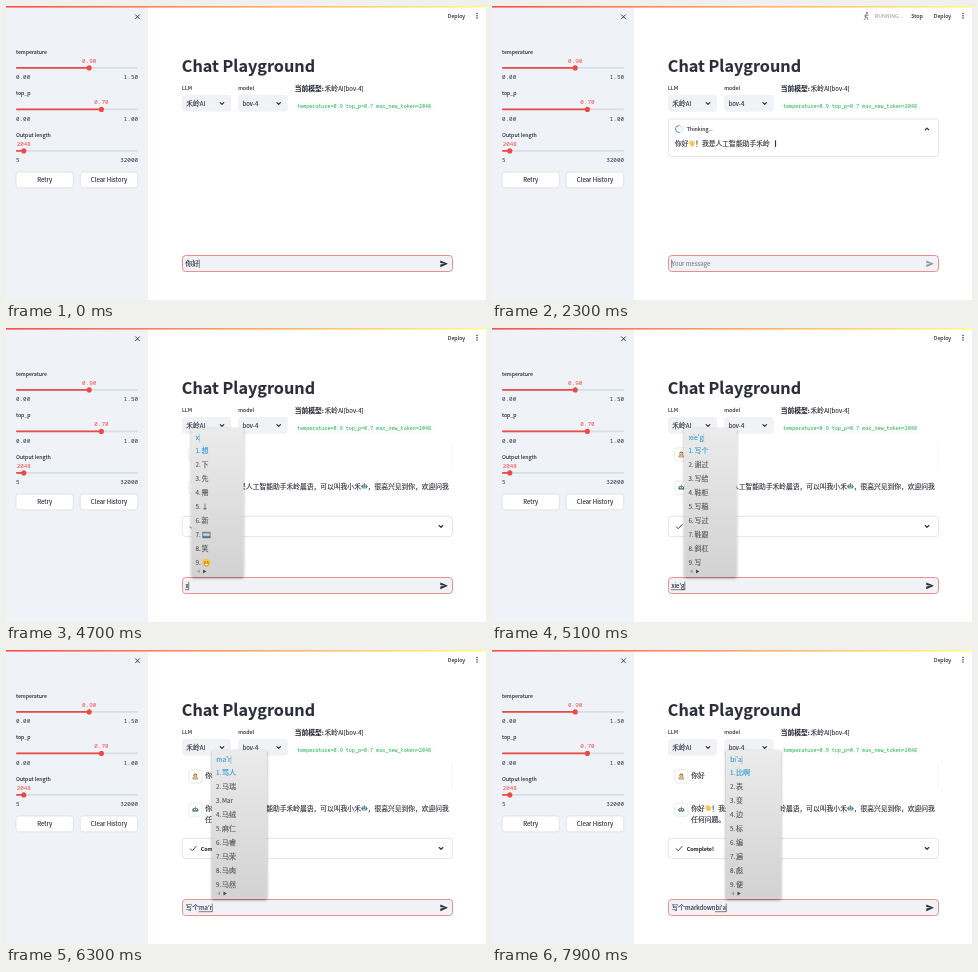
An HTML page that plays this animation: 480 px wide and 294 px high, repeating every 8000 ms.

```html
<!DOCTYPE html>
<html lang="zh-CN">
<head>
<meta charset="utf-8">
<title>Chat Playground</title>
<style>
html, body { margin: 0; width: 100%; height: 100%; overflow: hidden; background: #fff; }
svg { display: block; width: 100%; height: 100%; }
text { font-family: "Noto Sans CJK SC", "Noto Sans CJK", "Noto Sans", sans-serif; white-space: pre; stroke-width: .12; }
text.mono { font-family: "Noto Sans Mono", "DejaVu Sans Mono", monospace; }
</style>
</head>
<body>
<svg viewBox="0 0 480 294">
  <defs>
    <linearGradient id="bar"><stop stop-color="#ff4b4b"/><stop offset="1" stop-color="#fffd80"/></linearGradient>
    <linearGradient id="menu" x2="0" y2="1"><stop stop-color="#ebebeb"/><stop offset="1" stop-color="#d2d2d2"/></linearGradient>
    <filter id="shadow" x="-20%" y="-10%" width="140%" height="120%">
      <feDropShadow dx="0" dy="1" stdDeviation="1.6" flood-opacity=".4"/>
    </filter>
  </defs>
  <g id="fixed"></g>
  <g id="live"></g>
</svg>
<script>
const LOOP = 8000, STEP = 100;
const EM = 6.77, SMALL = 5.92;
const LATIN = 0.895; // Latin letters are drawn smaller than the CJK ones beside them
const INK = '#2b2d39', RED = '#ea4b49', PALE = '#f0f2f6', GREY = '#7f818a', BLUE = '#2a9bd0';
const REPLY = '你好\u3000！我是人工智能助手禾岭晨语，可以叫我小禾\u3000，很高兴见到你，欢迎问我任何问题。';
const HAND = 2, ROBOT = 23;
const SENT = 300, OPENED = 500, STREAM = 1900, DONE = 3200, CHARS_PER_MS = 0.036;

// time, committed text, pinyin being composed, candidates
const TYPING = [
  [0, '你好'],
  [SENT, ''],
  [4500, '', 'x', '想 下 先 需 ↓ 新 @tram 笑 @smile'],
  [4800, '', 'xi', '系 西 洗 喜 戏 细 息 希 吸'],
  [4900, '', 'xie', '写 些 谢 鞋 斜 协 歇 血 携'],
  [5100, '', "xie'g", '写个 谢过 写给 鞋柜 写稿 写过 鞋跟 斜杠 写'],
  [5400, '写个'],
  [5800, '写个', 'm', '吗 没 么 们 买 马 嘛 慢 妈'],
  [6000, '写个', 'ma', '吗 马 妈 嘛 麻 骂 码 玛 蚂'],
  [6200, '写个', "ma'r", '骂人 马瑞 Mar 马绒 麻仁 马睿 马荣 马肉 马然'],
  [6500, '写个', "ma'r'k", '骂人 mark 马瑞 麻仁 马睿 马荣 马肉 马然 马'],
  [6700, '写个', "ma'r'k'd", '骂人 markd 马瑞 麻仁 马睿 马荣 马肉 马然 马'],
  [6900, '写个', "ma'r'k'do", '骂人 markdo 马瑞 麻仁 马睿 马荣 马肉 马然 马'],
  [7000, '写个', 'markdow', 'markdow 骂人 马瑞 麻仁 马睿 马荣 马肉 马然 马'],
  [7100, '写个', 'markdown', 'markdown 骂人 马瑞 麻仁 马睿 马荣 马肉 马然 马'],
  [7300, '写个markdown'],
  [7600, '写个markdown', 'b', '不 吧 把 被 比 别 并 本 北'],
  [7700, '写个markdown', 'bi', '比 必 笔 币 毕 闭 避 鼻 壁'],
  [7900, '写个markdown', "bi'a", '比啊 表 变 边 标 编 遍 彪 便']
];

const ruler = document.createElement('canvas').getContext('2d');
ruler.font = '100px "Noto Sans CJK SC", "Noto Sans CJK", "Noto Sans", sans-serif';

const runs = s => s.match(/[\x20-\x7e]+|[^\x20-\x7e]+/g) || [];
const runSize = (run, size) => run.charCodeAt(0) < 127 ? size * LATIN : size;
const widthOf = (s, size) => runs(s).reduce((w, r) => w + ruler.measureText(r).width * runSize(r, size) / 100, 0);

function text(x, y, s, { size = EM, fill = INK, weight = 400, anchor = 'start' } = {}) {
  const spans = runs(s).map(r => `<tspan font-size="${runSize(r, size)}">${r}</tspan>`).join('');
  return `<text x="${x}" y="${y}" fill="${fill}" stroke="${fill}" font-weight="${weight}" text-anchor="${anchor}">${spans}</text>`;
}
const mono = (x, y, s, fill = INK, anchor = 'start', size = SMALL) =>
  `<text class="mono" x="${x}" y="${y}" fill="${fill}" font-size="${size}" text-anchor="${anchor}">${s}</text>`;
const rect = (x, y, w, h, fill, stroke = 'none', r = 3.2, line = 0.6) =>
  `<rect x="${x}" y="${y}" width="${w}" height="${h}" rx="${r}" fill="${fill}" stroke="${stroke}" stroke-width="${line}"/>`;
const circle = (x, y, r, fill) => `<circle cx="${x}" cy="${y}" r="${r}" fill="${fill}"/>`;
const line = (d, color = INK, w = 1) =>
  `<path d="${d}" fill="none" stroke="${color}" stroke-width="${w}" stroke-linecap="round" stroke-linejoin="round"/>`;
const chevron = (x, y, dir = 1) => line(`M${x - 1.8} ${y - 0.9 * dir}l1.8 ${1.8 * dir}l1.8 ${-1.8 * dir}`, INK, 1.15);
const at = (x, y, s, scale = 1) => `<g transform="translate(${x} ${y}) scale(${scale})">${s}</g>`;

// Small pictures, each about 6.5 units wide and centred on the origin
const icons = {
  hand: line('M-1.6 .2L-2.4-1.6M-.5-.6L-1.1-2.7M.7-.6L.5-2.6M1.8.2L2.5-1.3', '#f3bd35', 1.1) +
    `<ellipse cx=".3" cy="1" rx="2.1" ry="1.9" fill="#f7c744"/>`,
  robot: rect(-2.6, -1.6, 5.2, 4, '#5f8f97', 'none', 1) + rect(-3.2, -0.4, 6.4, 1.5, '#4a747d', 'none', 0.5) +
    line('M0-1.6V-2.7', '#c65a4a', 0.9) + circle(-1.1, -0.3, 0.6, '#fff') + circle(1.1, -0.3, 0.6, '#fff') +
    line('M-1 1.5H1', '#e6efef', 0.6),
  person: circle(0, -1.1, 1.9, '#8a5a3c') + circle(0, -0.7, 1.4, '#f4c471') +
    rect(-3, 0.8, 6, 2.2, '#d99a5b', 'none', 1) + rect(-1.6, 1, 3.2, 1.9, '#b9bec6', 'none', 0.4),
  tram: rect(-3.7, -2.8, 7.4, 5.8, '#75889a', 'none', 0.8) + rect(-2.8, -1.3, 5.6, 2, '#c9dceb', 'none', 0.3) +
    line('M-3.2 2H3.2', '#4f6173', 0.7),
  smile: circle(0, 0, 3.6, '#f9c637') + circle(-1.2, -0.8, 0.5, '#6b4518') + circle(1.2, -0.8, 0.5, '#6b4518') +
    '<path d="M-2 .6H2A2 2 0 0 1-2 .6" fill="#fff" stroke="#8b4a25" stroke-width=".4"/>'
};

function slider(y, label, value, share, low, high) {
  const x = 10 + 122 * share;
  return text(10, y - 14, label, { size: SMALL }) +
    mono(Math.max(x, 17.4), y - 5.1, value, RED, 'middle') +
    rect(10, y - 0.85, 122, 1.7, '#d9dee6', 'none', 0.8) + rect(10, y - 0.85, x - 10, 1.7, RED, 'none', 0.8) +
    circle(x, y, 2.55, RED) + mono(10, y + 11.3, low) + mono(132, y + 11.3, high, INK, 'end');
}
const button = (x, w, label) => rect(x, 166, w, 15.8, '#fff', '#d3d6dc') +
  text(x + w / 2, 176.2, label, { anchor: 'middle' });
const select = (x, w, label, value) => text(x, 84.2, label, { size: SMALL }) +
  rect(x, 89, w, 16.8, PALE) + text(x + 4.2, 99.8, value) + chevron(x + w - 9, 97.5);

function page() {
  return rect(0, 0, 142, 294, '#eff2f6', 'none', 0) + rect(0, 0, 480, 1.6, 'url(#bar)', 'none', 0) +
    line('M129.5 8.8l4 4m0-4l-4 4', INK, 0.9) +
    slider(61.9, 'temperature', '0.90', 0.6, '0.00', '1.50') +
    slider(103.4, 'top_p', '0.70', 0.7, '0.00', '1.00') +
    slider(144.9, 'Output length', '2048', 0.064, '5', '32000') +
    button(10, 57.3, 'Retry') + button(74.2, 57.5, 'Clear History') +
    text(441.8, 12, 'Deploy', { size: SMALL }) + [7.6, 9.8, 12].map(y => circle(471, y, 0.75, INK)).join('') +
    text(175.8, 66, 'Chat Playground', { size: 18.1, weight: 700 }) +
    select(176, 49, 'LLM', '禾岭AI') + select(232.2, 49.5, 'model', 'bov-4') +
    text(288.8, 84.6, '当前模型:', { weight: 700 }) + text(318.6, 84.6, '禾岭AI[bov-4]') +
    rect(289, 96, 138, 9, '#fbfcfd', 'none', 1.5) +
    mono(291, 102.2, 'temperature=0.9 top_p=0.7 max_new_token=2048', '#22b14c', 'start', 5.08);
}

// Reply text broken into lines, with its two pictures
function reply(x, y, count, perLine) {
  const shown = REPLY.slice(0, count);
  let out = '';
  for (let i = 0; i * perLine < shown.length; i++)
    out += text(x, y + 10.9 * i, shown.slice(i * perLine, (i + 1) * perLine));
  if (count > HAND) out += at(x + EM * (HAND + 0.5), y - 2.4, icons.hand);
  if (count > ROBOT) out += at(x + EM * (ROBOT + 0.5), y - 2.4, icons.robot);
  return out;
}

function running(t) {
  const legs = t % 400 < 200
    ? 'M.3-1.4L-.6 1L1 2.2L.6 4M-.6 1L-1.6 2.8H-3M.3-1.4L-1.6-1L-2.4.4M.3-1.4L1.6.2L2.8-.2'
    : 'M.3-1.4L-.2 1L1.6 1.6L1.8 3.4M-.2 1L-.8 2.6L-2 3.8M.3-1.4L-1.2-.6L-1 .8M.3-1.4L1.4-.2L2.4-1.2';
  return at(374, 10.2, circle(1, -3.2, 1, '#777982') + line(legs, '#777982', 0.8)) +
    text(382.8, 12, 'RUNNING...', { size: SMALL, fill: '#a9abb1' }) + text(419.3, 12, 'Stop', { size: SMALL });
}

function thinking(t) {
  const perLine = 37;
  const count = Math.min(REPLY.length, Math.max(0, Math.floor((t - STREAM) * CHARS_PER_MS + 0.01)));
  const row = count > perLine ? 1 : 0;
  const cursorX = 183 + (count - row * perLine) * EM + 5.6, cursorY = 134.3 + row * 10.9;
  const turn = (t - 2300) * 0.48;
  return rect(176.3, 113, 270.2, 37.4 + row * 10.9, '#fff', '#d3d4d8') +
    at(187, 123, '<circle r="3.5" fill="none" stroke="#d3dde6" stroke-width=".9"/>' +
      `<g transform="rotate(${turn})">${line('M0 3.5A3.5 3.5 0 0 1 0-3.5', '#4b96bb', 0.9)}</g>`) +
    text(194.8, 125, 'Thinking...', { size: SMALL }) + chevron(435, 123, -1) +
    reply(183, 139.9, count, perLine) + rect(cursorX - 0.4, cursorY, 1.1, 6.6, INK, 'none', 0);
}

const avatar = (y, icon) => rect(182.7, y, 13.3, 13.3, '#fff', '#dcdde1') + at(189.3, y + 6.7, icon);

function history() {
  return line('M446 114V138', '#f0f1f4', 0.8) +
    avatar(119.8, icons.person) + text(199.3, 128.4, '你好') +
    avatar(153, icons.robot) + reply(199.3, 160.6, REPLY.length, 36) +
    rect(176.3, 188.3, 270.2, 20.3, '#fff', '#d3d4d8') +
    line('M184.3 198.8l1.9 1.9l3.9-4.2', INK, 0.9) +
    text(194.8, 200.6, 'Complete!', { size: SMALL, weight: 700 }) + chevron(435, 198.4);
}

function menu(x, w, pinyin, list) {
  const rows = list.split(' ').map((word, i) => {
    const y = 125.4 + 13.95 * i, style = { size: 7, fill: i ? '#555' : BLUE };
    return text(x + 4, y, `${i + 1}.`, style) + (word[0] === '@'
      ? at(x + 14.8, y - 2.2, icons[word.slice(1)], 1.15)
      : text(x + 10, y, word, style));
  });
  const end = x + 4.5 + widthOf(pinyin, 7.5);
  return `<g filter="url(#shadow)">${rect(x, 100.6, w, 148.4, 'url(#menu)', 'none', 1)}</g>` +
    text(x + 4.2, 112.2, pinyin, { size: 7.5, fill: BLUE }) + line(`M${end} 106.2V113.8`, '#7bbbd8', 0.6) +
    rows.join('') +
    `<path d="M${x + 8} 241.6v3.6l-2.4-1.8z" fill="#999"/><path d="M${x + 11.5} 241.4v4l3.2-2z" fill="#444"/>`;
}

function input(t) {
  const [, done, pinyin = '', list] = TYPING.findLast(row => row[0] <= t);
  const x = 179.4, full = done + pinyin, start = x + widthOf(done, EM), end = x + widthOf(full, EM);
  const caretOn = full || (t - SENT) % 1000 < 500;
  let out = rect(176.5, 249.5, 270, 16, PALE, '#e98f8f', 3.2, 1) +
    (full ? text(x, 260.2, full) : text(x + 0.4, 260.2, 'Your message', { fill: GREY })) +
    `<path d="M434.3 254.4L442 257.8L434.3 261.2V258.6L439 257.8L434.3 257Z" fill="${full ? INK : '#9a9ca5'}"/>`;
  if (caretOn) out += line(`M${end + 0.3} 254V261.4`, INK, 0.6);
  if (pinyin) out += line(`M${start} 261.7H${end}`, INK, 0.6) +
    menu(Math.max(185.6, end), t < 5400 ? 51.8 : 54.8, pinyin, list);
  return out;
}

function scene(t) {
  let out = '';
  if (t >= SENT && t < DONE) out += running(t);
  if (t >= OPENED && t < DONE) out += thinking(t);
  if (t >= DONE) out += history();
  return out + input(t);
}

const live = document.getElementById('live');
document.getElementById('fixed').innerHTML = page();
const begin = performance.now();
let last = -1;
function frame() {
  const t = Math.floor((performance.now() - begin) % LOOP / STEP) * STEP;
  if (t !== last) live.innerHTML = scene(last = t);
  requestAnimationFrame(frame);
}
frame();
</script>
</body>
</html>
```
